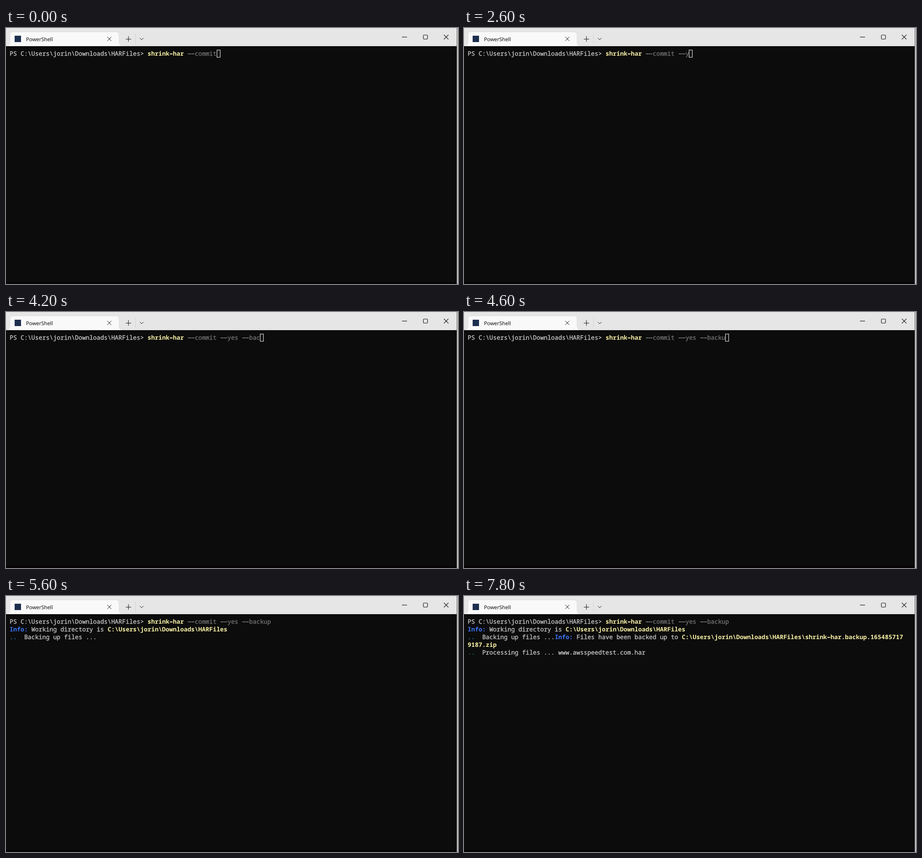
These frames come from a looping animation (993x564 px, 8 s). An HTML page:

```html
<!DOCTYPE html>
<html lang="en">
<head>
<meta charset="utf-8">
<title>Terminal</title>
<style>
  html, body { margin: 0; width: 993px; height: 564px; overflow: hidden; background: #0c0c0c; }
  svg { display: block; }
  #term text {
    font: 400 13.2917px "Noto Sans Mono", "DejaVu Sans Mono", monospace;
    font-variant-ligatures: none;
    text-rendering: geometricPrecision;
    white-space: pre;
    stroke-width: .3px;
  }
  #term text.bold { font-weight: 600; stroke: none; }
  #cursor { fill: none; stroke: #fff; }
  .tab-title { font: 500 11.4px "Open Sans", "Noto Sans", sans-serif; text-rendering: geometricPrecision; }
  .icon { fill: none; stroke: #1a1a1a; }
</style>
</head>
<body>
<svg width="993" height="564" viewBox="0 0 993 564">
  <rect width="993" height="564" fill="#0c0c0c"/>
  <rect y="560" width="991" height="4" fill="#070305"/>
  <rect width="991" height="40" fill="#e6e6e6"/>
  <rect x="990" width="1" height="564" fill="#6c6c6c"/>
  <rect x="991" width="2" height="564" fill="#c6c6c6"/>

  <path d="M2 40Q8 40 8 34V16Q8 8 16 8H241Q249 8 249 16V34Q249 40 255 40Z" fill="#f9f9f9"/>
  <path d="M8.5 34V16Q8.5 8.5 16 8.5H241Q248.5 8.5 248.5 16V34" fill="none" stroke="#dadada"/>
  <rect x="19" y="17" width="14" height="14" fill="#1d2f4f"/>
  <text class="tab-title" x="44" y="29">PowerShell</text>

  <path class="icon" d="M222.5 19.5l9 9m0-9l-9 9"/>
  <path class="icon" d="M263 24.5h12m-6-6.500v12" stroke-width="1.1"/>
  <path d="M284.5 13v22" stroke="#d2d2d2"/>
  <path class="icon" d="M294 22l4 4l4-4"/>
  <path class="icon" d="M870 20h11" stroke-width="1.2"/>
  <rect class="icon" x="917" y="15.500" width="9" height="9" rx="1.500" stroke-width="1.2"/>
  <path class="icon" d="M962 15l10 10m0-10l-10 10" stroke-width="1.1"/>

  <g id="term"></g>
  <rect id="cursor" width="7" height="16"/>
</svg>
<script>
const NS = "http://www.w3.org/2000/svg";
const LOOP = 8000, LEFT = 8, TOP = 48, CELL = 7.975, ROW = 17;
const WHITE = "#cccccc", YELLOW = "#f9f1a5", GREY = "#767676", BLUE = "#3b78ff", CYAN = "#3a96dd", GREEN = "#2a8a5a";
const term = document.getElementById("term");
const cursor = document.getElementById("cursor");

const HOME = "C:\\Users\\jorin\\Downloads\\HARFiles";
const PROMPT = `PS ${HOME}> `;
const ARGS = " --commit";
const TYPED = " --yes --backup";

// [time, characters of TYPED on screen]
const KEYS = [
  [0, 0], [1000, 2], [2000, 3], [2600, 4], [2800, 5], [3000, 7], [3400, 8],
  [3600, 9], [3800, 10], [4000, 11], [4200, 12], [4400, 13], [4600, 14], [4800, 15]
];
const CURSOR_OFF = [[400, 1000], [1600, 2000], [5600, LOOP]];

// [time, spinner, spinner colour, file]
const FILES = [
  [7400, "...", CYAN, "awsspeedtest.xvf.dk.har"],
  [7600, ".", GREEN, "dev.awsspeedtest.dk.har"],
  [7800, "..", GREEN, "www.awsspeedtest.com.har"]
];

const latest = (list, t) => list.filter(item => item[0] <= t).pop();

function add(tag, attrs) {
  const el = document.createElementNS(NS, tag);
  for (const key in attrs) el.setAttribute(key, attrs[key]);
  return term.appendChild(el);
}

// Hyphens join into full-width strokes, as in a coding font.
function put(row, col, text, fill, bold) {
  const y = TOP + row * ROW, x = LEFT + col * CELL;
  add("text", { x, y: y + 13, fill, stroke: fill, class: bold ? "bold" : "" }).textContent = text;
  for (const m of text.matchAll(/-+/g)) {
    add("rect", {
      x: x + m.index * CELL + 0.6, y: y + 8.3,
      width: m[0].length * CELL - 1.2, height: 1.4, fill
    });
  }
  return col + text.length;
}

function drawOutput(t) {
  let col = put(1, 0, "Info:", BLUE, true);
  col = put(1, col, " Working directory is ", WHITE);
  put(1, col, HOME, YELLOW, true);
  put(2, 0, "..", CYAN);
  col = put(2, 4, "Backing up files ...", WHITE);

  const file = latest(FILES, t);
  if (!file) return;
  col = put(2, col, "Info:", BLUE, true);
  col = put(2, col, " Files have been backed up to ", WHITE);
  put(2, col, HOME + "\\shrink-har.backup.165485717", YELLOW, true);
  put(3, 0, "9187.zip", YELLOW, true);
  put(4, 0, file[1], file[2]);
  put(4, 4, "Processing files ... " + file[3], WHITE);
}

function draw(t) {
  term.textContent = "";
  let col = put(0, 0, PROMPT, WHITE);
  col = put(0, col, "shrink-har", YELLOW, true);
  col = put(0, col, ARGS + TYPED.slice(0, latest(KEYS, t)[1]), GREY);
  if (t >= 5600) drawOutput(t);

  const entered = t >= 5400;
  const hidden = CURSOR_OFF.some(([from, to]) => t >= from && t < to);
  cursor.setAttribute("x", Math.round(LEFT + (entered ? 0 : col) * CELL) + 0.5);
  cursor.setAttribute("y", TOP + (entered ? ROW : 0) + 0.5);
  cursor.setAttribute("visibility", hidden ? "hidden" : "visible");
}

const start = performance.now();
let shown = -1;
function tick() {
  const t = (performance.now() - start) % LOOP;
  const step = Math.floor(t / 200);
  if (step !== shown) draw(step * 200);
  shown = step;
  requestAnimationFrame(tick);
}
tick();
</script>
</body>
</html>
```
